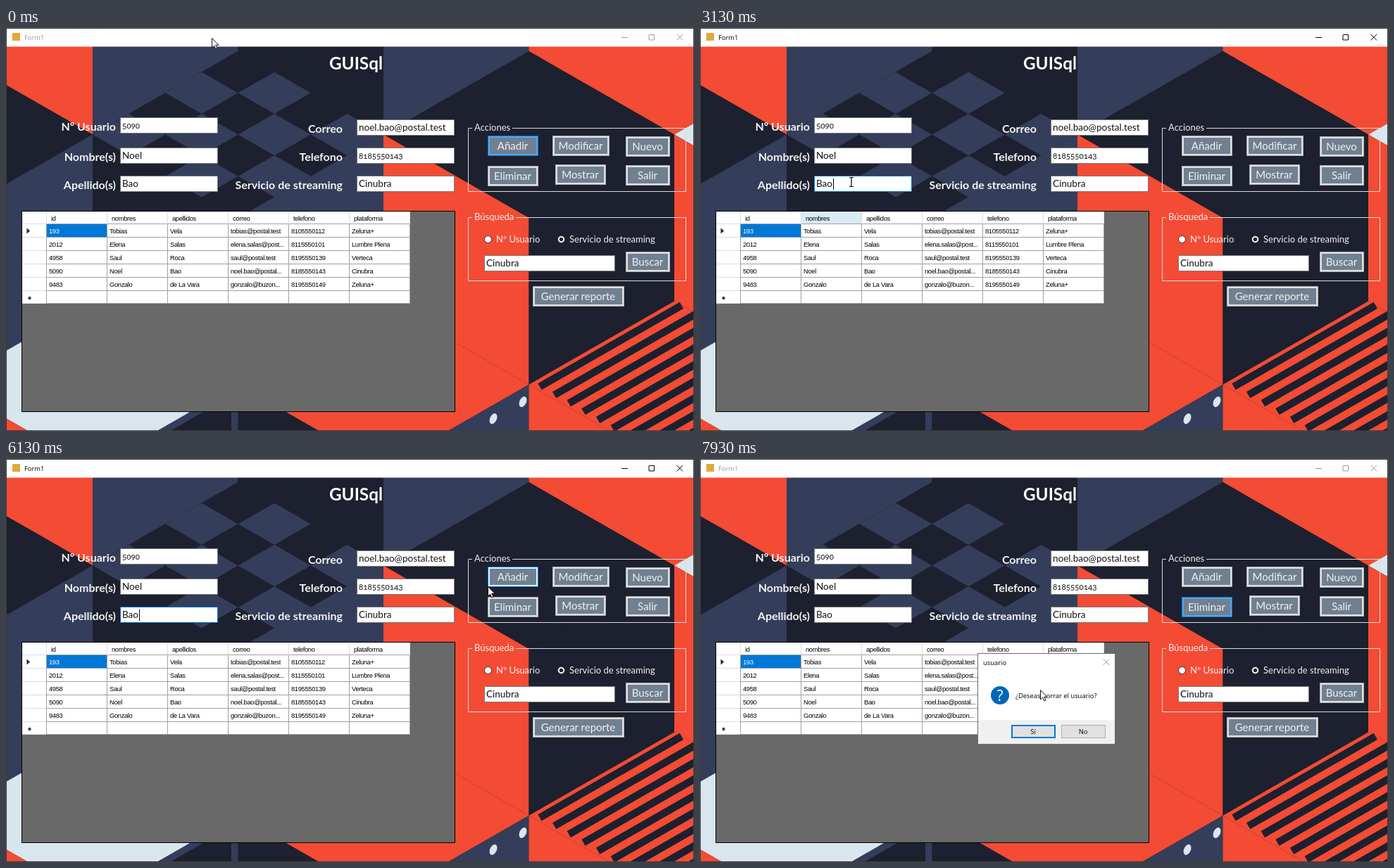
Animation of 977 by 573 pixels, one loop 8 s. Source, as an HTML page:

```html
<!DOCTYPE html>
<html lang="es">
<head>
<meta charset="utf-8">
<title>Form1</title>
<style>
  html, body { margin: 0; width: 100%; height: 100%; overflow: hidden; background: #1d202e; }
  svg { display: block; width: 977px; height: 573px; }
  text { white-space: pre; }
  .form { font-family: Lato, "Open Sans", sans-serif; font-size: 13.5px; font-variant-numeric: oldstyle-nums; }
  .title { font-weight: 700; font-size: 24.3px; fill: #fff; text-anchor: middle; }
  .label { font-weight: 700; font-size: 16px; fill: #f4f4f4; text-anchor: end; }
  .number { font-size: 11.6px; }
  .small { font-size: 13px; fill: #f0f0f0; }
  .face { font-size: 15px; fill: #f0f0f0; text-anchor: middle; }
  .grid { font-family: "Liberation Sans", Arial, sans-serif; font-size: 9.4px; letter-spacing: -.35px; }
  .sys { font-family: "Open Sans", "Noto Sans", sans-serif; font-size: 9.4px; }
  .mid { text-anchor: middle; }
  .mark { font-size: 21px; fill: #fff; }
</style>
</head>
<body>
<svg id="stage" viewBox="0 0 977 573"></svg>
<script>
const RED = '#f34b34', NAVY = '#343d5a', DARK = '#1d202e', PALE = '#d9e6ee', BLUE = '#0078d7';
const out = [];
const add = s => out.push(s);
const poly = (points, fill) => add(`<polygon points="${points.join(' ')}" fill="${fill}"/>`);
const rect = (x, y, w, h, fill, extra = '') =>
  add(`<rect x="${x}" y="${y}" width="${w}" height="${h}" fill="${fill}" ${extra}/>`);
const box = (x, y, w, h, fill, stroke, extra = '') =>
  rect(x + .5, y + .5, w - 1, h - 1, fill, `stroke="${stroke}" ${extra}`);
const text = (x, y, s, cls, extra = '') => add(`<text x="${x}" y="${y}" class="${cls}" ${extra}>${s}</text>`);
const path = (d, stroke, extra = '') => add(`<path d="${d}" fill="none" stroke="${stroke}" ${extra}/>`);

// Wallpaper: cubes on an isometric lattice, each named by its top corner
const at = (i, j) => [123 + 206.5 * i, 33 + 118.5 * j];
function cube(i, j, top, left, right) {
  const west = at(i - 1, j + 1), east = at(i + 1, j + 1), front = at(i, j + 2);
  const foot = at(i, j + 4);
  if (top) poly([at(i, j), east, front, west], top);
  if (left) poly([west, front, foot, at(i - 1, j + 3)], left);
  if (right) poly([east, front, foot, at(i + 1, j + 3)], right);
}
function wallpaper() {
  rect(0, 0, 977, 573, DARK);
  cube(0, -3, DARK, RED, NAVY);
  cube(2, -3, DARK, DARK, NAVY);
  cube(4, -3, RED, RED, RED);
  cube(-1, 0, DARK, DARK, NAVY);
  cube(1, 0, DARK, DARK, NAVY);
  cube(3, 0, DARK, RED, DARK);
  cube(5, 0, PALE, RED, DARK);
  cube(0, 3, PALE, RED, NAVY);
  cube(2, 3, RED, DARK, NAVY);
  cube(4, 3, RED, RED, DARK);

  for (let a = 0; a < 4; a++)
    for (let b = 0; b < 4; b++) {
      const i = 1 + (a - b) / 4, j = (a + b) / 4;
      if ((a + b) % 2) poly([at(i, j), at(i + .25, j + .25), at(i, j + .5), at(i - .25, j + .25)], NAVY);
    }
  poly([at(.954, 4.13), at(.954, 5), at(.1, 5)], DARK);
  for (let k = 0; k < 3; k++) {
    const x = 734 - 42 * k, y = 531.5 + 24 * k;
    add(`<ellipse cx="${x}" cy="${y}" rx="4.8" ry="8" fill="${PALE}" transform="rotate(24 ${x} ${y})"/>`);
  }
  for (let k = .5; k < 10; k++) {
    const from = at(3 + k / 10 + .025, 4 + k / 10 - .025), to = at(4 + k / 10, 3 + k / 10);
    path(`M${from}L${to}`, DARK, 'stroke-width="10.5"');
  }
}

function titleBar() {
  rect(0, 0, 977, 26.5, '#fff');
  rect(9, 7, 11, 11, '#e3a83a');
  add('<g id="caption">');
  text(26, 17, 'Form1', 'sys', 'fill="currentColor"');
  path('M874 13.5H883M913.5 9.5h7v7.5h-7.5v-7.5M952.5 9l8.5 8.5M961 9l-8.5 8.5', 'currentColor');
  add('</g>');
}

const field = (x, y, w, label, value) => ({ x, y, w, h: 23, label, value });
const fields = [
  field(162, 127, 139, 'Nº Usuario', '5090'),
  field(162, 170, 139, 'Nombre(s)', 'Noel'),
  field(162, 210, 139, 'Apellido(s)', 'Bao'),
  field(498, 130, 139, 'Correo', 'noel.bao@postal.test'),
  field(498, 170, 139, 'Telefono', '8185550143'),
  field(498, 210, 139, 'Servicio de streaming', 'Cinubra'),
  field(679, 323, 186, '', 'Cinubra')
];
const button = (x, y, w, label) => ({ x, y, w, h: 29, label });
const buttons = [
  button(684, 153, 72, 'Añadir'), button(776, 153, 81, 'Modificar'), button(880, 154, 63, 'Nuevo'),
  button(684, 196, 72, 'Eliminar'), button(780, 194, 72, 'Mostrar'), button(880, 195, 63, 'Salir'),
  button(880, 318, 63, 'Buscar'), button(748, 367, 130, 'Generar reporte')
];
const ADD = 0, DELETE = 3, SURNAME = 2;

function group(y, h, label, end) {
  path(`M662 ${y}H656.5v${h}H965.5v${-h}H${end}`, '#dcdcdc');
  text(665, y + 3.5, label, 'form small');
}
function form() {
  text(497, 58.5, 'GUISql', 'form title');
  fields.forEach((f, i) => {
    text(f.x < 400 ? 156 : 478, f.y + 18.5, f.label, 'form label');
    box(f.x, f.y, f.w, f.h, '#fff', '#7a7a7a', `id="field${i}"`);
    text(f.x + 3, f.y + 16, f.value, /^\d/.test(f.value) ? 'form number' : 'form', 'fill="#111"');
  });
  rect(189, 214, 1, 16, '#000', 'id="caret"');
  group(142.5, 90, 'Acciones', 719);
  group(269.5, 90, 'Búsqueda', 724);
  for (const [x, label] of [[684.5, 'Nº Usuario'], [788.5, 'Servicio de streaming']]) {
    add(`<circle cx="${x}" cy="300.5" r="5" fill="#fff" stroke="#333"/>`);
    text(x + 11.5, 305, label, 'form small');
  }
  add('<circle cx="788.5" cy="300.5" r="2.7" fill="#222"/>');
  buttons.forEach(({ x, y, w, h, label }, i) => {
    box(x, y, w, h, '#e1e1e1', '#adadad', `id="button${i}"`);
    rect(x + 3, y + 3, w - 6, h - 6, '#708090');
    text(x + w / 2 - .5, y + h / 2 + 5.5, label, 'form face');
  });
}

const rows = [
  'id|nombres|apellidos|correo|telefono|plataforma',
  '193|Tobias|Vela|tobias@postal.test|8105550112|Zeluna+',
  '2012|Elena|Salas|elena.salas@post...|8115550101|Lumbre Plena',
  '4958|Saul|Roca|saul@postal.test|8195550139|Verteca',
  '5090|Noel|Bao|noel.bao@postal...|8185550143|Cinubra',
  '9483|Gonzalo|de La Vara|gonzalo@buzon...|8195550149|Zeluna+'
];
const COL = 86, ROW = 18.9;
function table() {
  box(22, 260, 616, 286, '#696969', '#000');
  rect(23, 261, 551, 131, '#fff');
  rect(144, 261, COL, 18, '#d9ebf5', 'id="header"');
  rect(58, 279, COL, 19, BLUE);
  for (let r = 0; r < 7; r++) {
    const y = Math.round(279 + r * ROW) - .5;
    path(`M58 ${y}H574`, '#a0a0a0');
    path(`M23 ${y}H58`, '#dcdcdc');
  }
  for (let c = 0; c < 7; c++) {
    const x = 57.5 + c * COL;
    path(`M${x} 279V392`, '#a0a0a0');
    path(`M${x} 261V279`, '#dcdcdc');
  }
  rows.forEach((row, r) => row.split('|').forEach((s, c) =>
    text(58 + c * COL + (r ? 3 : 6), 273.5 + r * ROW, s, 'grid', `fill="${r === 1 && !c ? '#fff' : '#000'}"`)));
  poly(['29.5,284.5', '34,288.5', '29.5,292.5'], '#222');
  add('<circle cx="33.5" cy="384" r="2.2" fill="#444"/>');
}

function dialog() {
  add('<g id="dialog">');
  box(394, 276, 196, 130, '#fff', '#6b6b6b');
  rect(395, 371, 194, 34, '#f0f0f0');
  text(402, 293, 'usuario', 'sys');
  path('M572.5 284.5l8.5 8.5M581 284.5l-8.5 8.5', '#999');
  add('<circle cx="426" cy="336" r="13" fill="#0067b8"/>');
  text(426, 343.5, '?', 'sys mid mark');
  text(448, 340, '¿Deseas borrar el usuario?', 'sys');
  rect(443, 379, 61, 17, '#e1e1e1', `stroke="${BLUE}" stroke-width="2"`);
  box(513, 378, 63, 19, '#e1e1e1', '#adadad');
  text(473, 391, 'Sí', 'sys mid');
  text(544, 391, 'No', 'sys mid');
  add('</g>');
}

function cursors() {
  add('<path id="arrow" d="M.5.5V14L3.6 11.1 5.9 16 8 15.1 5.8 10.3H10Z" fill="#fff" stroke="#000" stroke-width=".9"/>');
  path('M-3-6.5H-1L0-5.5 1-6.5H3M0-5.5V5.5M-3 6.5H-1L0 5.5 1 6.5H3', '#000', 'id="beam" stroke-width="1.2"');
}

wallpaper();
titleBar();
form();
table();
dialog();
box(0, 0, 977, 573, 'none', '#3c3c3c');
cursors();
document.getElementById('stage').innerHTML = out.join('');
const $ = id => document.getElementById(id);

// Pointer stops: arrival in seconds, x, y, rest in seconds
const stops = [
  [0, 292, 14, .53], [.85, 404, 230], [1.13, 250, 440], [1.27, 92, 380], [1.4, 160, 300],
  [1.6, 330, 428], [1.75, 430, 340], [2.13, 200, 205], [2.46, 243, 143, .34], [3, 215, 219, .26],
  [3.5, 480, 250], [3.866, 743, 175], [4.4, 928, 180], [5, 829, 211], [5.4, 730, 221],
  [5.8, 715, 212, .13], [6.133, 684, 181], [6.45, 750, 253], [6.733, 707, 212, .4],
  [7.53, 707, 186, .07], [7.93, 483, 328, .07]
];
const track = stops.flatMap(([s, x, y, rest]) => rest ? [[s, x, y], [s + rest, x, y]] : [[s, x, y]]);
const rate = (i, axis) => (track[i + 1][axis] - track[i][axis]) / (track[i + 1][0] - track[i][0]);

// Smooth through the stops without overshoot
function slope(i, axis) {
  if (!track[i - 1] || !track[i + 1]) return 0;
  const a = rate(i - 1, axis), b = rate(i, axis);
  return a * b > 0 ? 2 * a * b / (a + b) : 0;
}
function pointer(s) {
  let i = 0;
  while (i < track.length - 2 && track[i + 1][0] <= s) i++;
  const p = track[i], q = track[i + 1], span = q[0] - p[0];
  const u = Math.min(1, (s - p[0]) / span), v = 1 - u;
  return [1, 2].map(a => p[a] * v * v * (1 + 2 * u) + q[a] * u * u * (1 + 2 * v)
    + span * u * v * (slope(i, a) * v - slope(i + 1, a) * u));
}

const show = (id, on) => $(id).setAttribute('visibility', on ? 'visible' : 'hidden');
const inside = (b, x, y) => x >= b.x - .5 && x < b.x + b.w && y >= b.y && y < b.y + b.h;

const TICK = 1000 / 15;
function draw(now) {
  const t = Math.floor(now % 8000 / TICK + .1) * TICK;
  const [x, y] = pointer(t / 1000);
  const asking = t >= 7130;
  const active = t >= 2530 && !asking;
  const typing = t >= 2930 && !asking;
  const focus = asking ? DELETE : typing ? -1 : ADD;

  $('caption').style.color = active ? '#000' : '#999';
  show('dialog', asking);
  show('header', t >= 2000 && t < 3400);
  show('caret', typing && Math.floor((t - 2800) / 530) % 2 === 0);

  let beam = false;
  fields.forEach((f, i) => {
    const over = !asking && inside(f, x, y);
    beam = beam || over;
    $('field' + i).setAttribute('stroke', typing && i === SURNAME ? BLUE : over ? '#333' : '#7a7a7a');
  });
  buttons.forEach((b, i) => {
    const over = !asking && inside(b, x, y), el = $('button' + i);
    el.setAttribute('stroke', over || i === focus ? BLUE : '#adadad');
    el.setAttribute('fill', i === focus ? '#5aa5e6' : over ? '#e5f1fb' : '#e1e1e1');
  });

  show('arrow', !beam);
  show('beam', beam);
  const place = `translate(${x.toFixed(1)} ${y.toFixed(1)})`;
  $('arrow').setAttribute('transform', place);
  $('beam').setAttribute('transform', place);
}

const start = performance.now();
function loop() {
  draw(performance.now() - start);
  requestAnimationFrame(loop);
}
loop();
</script>
</body>
</html>
```
